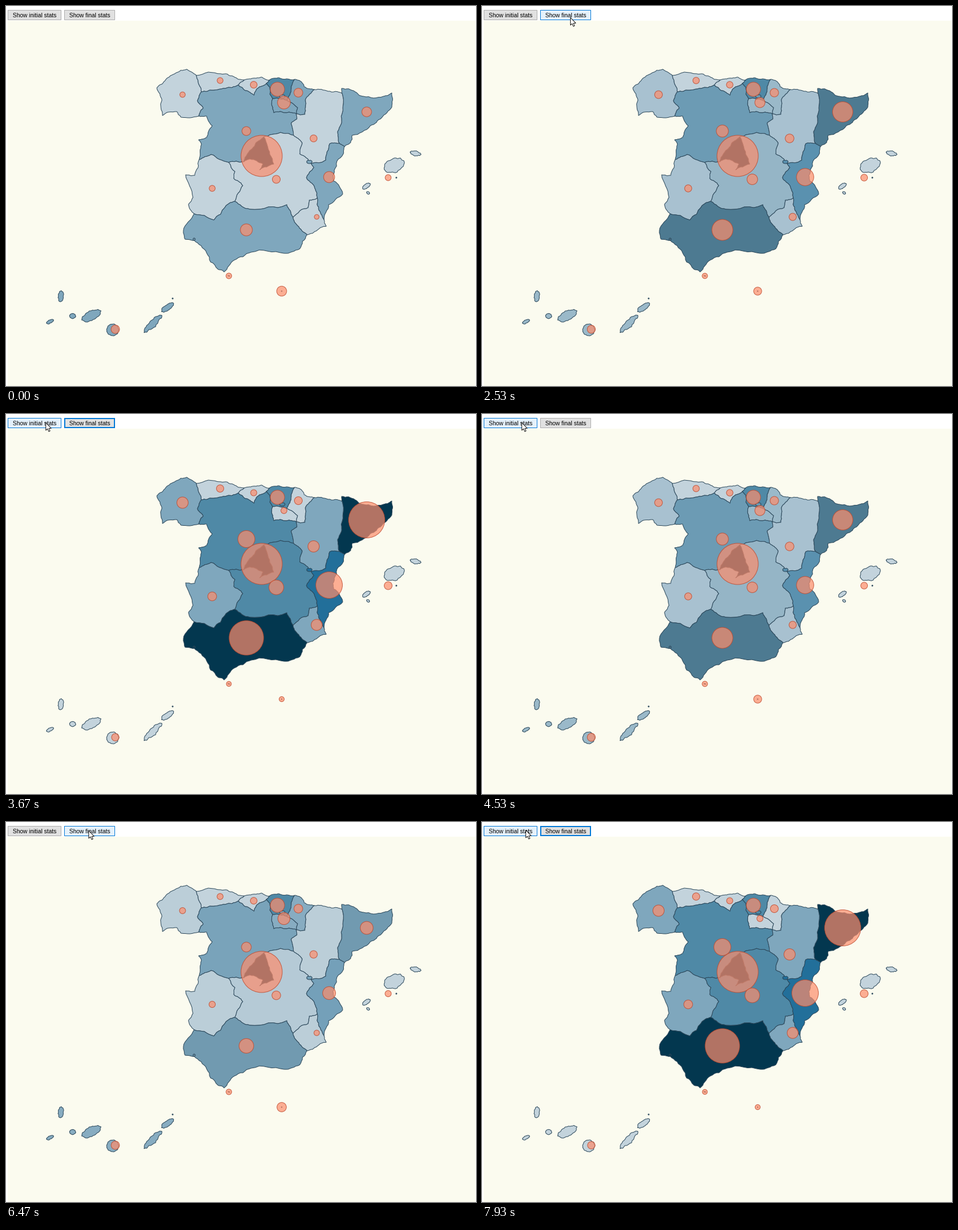
Write a matplotlib script that moves like this. It is 832 px wide and 673 px high and loops after 8 s.

```python
import matplotlib.pyplot as plt
import numpy as np
from matplotlib.animation import FuncAnimation
from matplotlib.patches import Circle, Polygon, Rectangle

W, H, DPI = 832, 673, 64
STEP, FRAMES = 40, 200
PX = 72 / DPI  # one pixel in points

PALETTE = np.array([(195, 211, 220), (127, 167, 189), (79, 137, 166), (34, 111, 154),
                    (3, 55, 79)]) / 255
CLASS_LIMITS = [7.3, 12, 20, 28]  # bubble radii where the fill colour changes
BORDER = "#2b475a"
BLUE = "#0078d7"

# Corners where borders meet.
NODES = dict(
    a=(337, 123), b=(341, 195), c=(346, 152), d=(422, 131), e=(411, 140), f=(461, 137),
    g=(467, 131), h=(511, 130), i=(497, 167), j=(472, 164), k=(514, 191), l=(546, 148),
    m=(595, 155), n=(590, 243), o=(540, 279), p=(509, 229), q=(599, 249), r=(394, 277),
    s=(342, 272), t=(551, 340), u=(508, 374), v=(405, 346), w=(333, 368), x=(563, 379),
    y=(533, 405), A=(456, 232), B=(421, 276), C=(449, 290),
)
# Key points between two corners; borders not listed run straight.
BENDS = dict(
    ab=[(320, 112), (300, 119), (283, 130), (267, 145), (276, 167), (277, 194), (302, 187),
        (310, 197)],
    bc=[(349, 181), (339, 168)],
    ca=[(341, 138)],
    ad=[(380, 120), (403, 125)],
    ce=[(361, 149), (388, 146)],
    dg=[(437, 128), (453, 126)],
    ef=[(424, 150), (439, 158), (445, 146)],
    fj=[(467, 144), (467, 156)],
    gh=[(483, 127)],
    hi=[(505, 146)],
    hl=[(521, 133), (528, 143)],
    ik=[(516, 180)],
    jk=[(471, 177), (474, 189), (497, 189)],
    kl=[(529, 192), (530, 166)],
    kp=[(515, 200), (505, 207)],
    lm=[(570, 151)],
    mn=[(597, 173), (594, 203), (587, 222)],
    mq=[(594, 146), (618, 152), (633, 160), (668, 160), (683, 154), (683, 179), (665, 198),
        (645, 212), (613, 229), (610, 242)],
    no=[(573, 244), (566, 273)],
    po=[(524, 242), (520, 262)],
    pA=[(486, 224)],
    AB=[(442, 243), (428, 261)],
    BC=[(432, 271), (455, 280)],
    CA=[(474, 280), (462, 245)],
    bs=[(355, 195), (365, 212), (355, 233), (341, 237), (346, 245)],
    sr=[(363, 263)],
    rv=[(405, 293), (403, 305), (419, 318)],
    sw=[(334, 300), (318, 299), (331, 339), (323, 352)],
    wv=[(368, 379), (388, 356)],
    vu=[(432, 360), (497, 352)],
    uy=[(516, 389)],
    wy=[(314, 398), (317, 413), (333, 415), (355, 437), (375, 466), (386, 471), (404, 450),
        (434, 436), (492, 438), (520, 430)],
    yx=[(551, 397), (567, 390)],
    xt=[(554, 362)],
    tu=[(537, 344), (535, 357)],
    qx=[(597, 262), (581, 291), (580, 310), (596, 333), (571, 352)],
    ot=[(545, 286), (532, 304), (546, 320)],
)

# Walk around the corners, bubble (x, y, radius before, radius after),
# islands and exclaves (x, y, half length, half width, tilt in degrees).
REGIONS = [
    ("abc", (312.5, 157, 4.8, 10), []),
    ("adec", (379, 132, 5.2, 6.5), []),
    ("dgfe", (438.5, 139.5, 6, 5.5), []),
    ("ghijf", (480.5, 147.5, 12.6, 12.6), []),
    ("hlki", (517.5, 153.5, 7.8, 7), []),
    ("jik", (492, 171, 11.4, 5.4), []),
    ("mqn", (638.5, 187.5, 8.6, 32), []),
    ("bcefjkpABrs", (425.5, 221.5, 7.8, 15), [(489, 160, 5, 3, 0)]),
    ("lmnopk", (544.5, 234.5, 6.2, 10), []),
    ("ABC", (452.5, 265.5, 36.5, 36.5), []),
    ("potuvrBCA", (478.5, 307, 7, 13), []),
    ("srvw", (365, 323, 5.3, 7.8), []),
    ("nqxto", (572, 303, 9.8, 23.5), [(537, 276, 5, 3, 0)]),
    ("txyu", (550, 373.5, 4.2, 9.8), []),
    ("wvuy", (425.5, 396.5, 10.6, 30.5), [(333, 413, 2, 2, 0)]),
    ("", (676.5, 304, 5.3, 7), [
        (687, 282, 19, 12, -25), (725, 261, 10, 4, 12), (638, 319, 8, 4, -35),
        (641, 331, 3, 2, 30), (691, 304, 1, 1, 0)]),
    ("", (394.5, 478, 5, 4.4), [(394.5, 478, 2, 0.6, 10)]),
    ("", (488, 505, 8.8, 4.5), [(488, 505, 0.8, 0.8, 0)]),
    ("", (193.5, 572.5, 7.5, 6.6), [
        (97, 514, 10, 5, 95), (78, 559, 7, 3, -25), (118, 549, 5.5, 4.5, 0),
        (151, 548, 19, 8, -25), (189, 573.5, 11, 10.5, 0), (260, 563, 22, 5.5, -44),
        (286, 534, 13, 5, -35), (295, 518, 1, 1, 0)]),
]

CLICKS = [2066, 3994, 6142]  # alternately "final" and "initial"
DURATION = 1000
ENTRY = (730, 441)
# start, end, x, y reached by the pointer
MOVES = [(400, 1200, 166, 30), (1200, 1520, 156, 20), (3180, 3640, 70, 15),
         (5280, 5860, 146, 15), (7620, 7920, 77, 14)]

rng = np.random.default_rng(7)
arcs = {}


def roughen(points, amount=0.11, levels=3):
    """Fractal midpoint displacement that keeps the given points."""
    for _ in range(levels):
        out = [points[0]]
        for (x0, y0), (x1, y1) in zip(points, points[1:]):
            k = rng.uniform(-amount, amount)
            out += [((x0 + x1) / 2 - k * (y1 - y0), (y0 + y1) / 2 + k * (x1 - x0)),
                    (x1, y1)]
        points = out
    return points


def arc(start, end):
    """Border between two corners, the same line in either direction."""
    if end + start in arcs:
        return arcs[end + start][::-1]
    if start + end not in arcs:
        bends = BENDS.get(start + end) or BENDS.get(end + start, [])[::-1]
        arcs[start + end] = roughen([NODES[start], *bends, NODES[end]])
    return arcs[start + end]


def outline(walk):
    return [point for start, end in zip(walk, walk[1:] + walk[0])
            for point in arc(start, end)[:-1]]


def island(x, y, length, width, tilt):
    angle, turn = np.linspace(0, 2 * np.pi, 11), np.radians(tilt)
    u, v = length * np.cos(angle), width * np.sin(angle)
    return roughen(list(zip(x + u * np.cos(turn) - v * np.sin(turn),
                            y + u * np.sin(turn) + v * np.cos(turn))), 0.18, 2)


def class_colour(radius):
    return PALETTE[np.searchsorted(CLASS_LIMITS, radius)]


def ease(u):
    u = min(max(u, 0), 1)
    return 4 * u ** 3 if u < 0.5 else 1 - 4 * (1 - u) ** 3


def pointer_at(t):
    x, y = ENTRY
    for start, end, to_x, to_y in MOVES:
        u = min(max((t - start) / (end - start), 0), 1)
        x, y = x + (to_x - x) * u, y + (to_y - y) * u
    return x, y


class Region:
    def __init__(self, walk, bubble, islands):
        x, y, self.before, self.after = bubble
        rings = [outline(walk)] if walk else []
        rings += [island(*spec) for spec in islands]
        self.shapes = [
            ax.add_patch(Polygon(ring, ec=BORDER, lw=PX, joinstyle="round", zorder=z))
            for z, ring in enumerate(rings, 1)
        ]
        self.bubble = ax.add_patch(Circle((x, y), self.before, zorder=20, lw=PX,
                                          fc=(0.992, 0.557, 0.427, 0.7),
                                          ec=(0.75, 0.29, 0.18, 0.85)))

    def show(self, p):
        first, last = class_colour(self.before), class_colour(self.after)
        for shape in self.shapes:
            shape.set_facecolor(first + (last - first) * p)
        self.bubble.set_radius(self.before + (self.after - self.before) * p)


class Button:
    def __init__(self, label, x, width):
        self.x, self.width = x, width
        self.box = ax.add_patch(Rectangle((x, 7), width, 18, snap=False))
        ax.text(x + width / 2, 20, label, ha="center", va="baseline",
                family="Liberation Sans", size=10.4 * PX, color="black")

    def contains(self, x, y):
        return self.x < x < self.x + self.width and 7 <= y < 25

    def show(self, hover, focus):
        line = 2 if focus and not hover else 1
        self.box.set(facecolor="#e5f1fb" if hover else "#e1e1e1",
                     edgecolor=BLUE if hover or focus else "#adadad", linewidth=line * PX)
        self.box.set_bounds(self.x + line / 2, 7 + line / 2, self.width - line, 18 - line)


fig = plt.figure(figsize=(W / DPI, H / DPI), dpi=DPI, facecolor="white")
ax = fig.add_axes([0, 0, 1, 1])
ax.set(xlim=(0, W), ylim=(H, 0))
ax.axis("off")
ax.add_patch(Rectangle((3, 26), 828, 647, fc="#fbfbef", ec="none", zorder=0))

regions = [Region(*spec) for spec in REGIONS]
buttons = [Button("Show initial stats", 3, 95), Button("Show final stats", 103, 90)]

ARROW = np.array([(0, 0), (0, 13.5), (3, 10.7), (5.2, 15.6), (7.4, 14.6), (5.3, 9.9),
                  (9.6, 9.9)])
arrow = ax.add_patch(Polygon(ARROW, fc="white", ec="black", lw=0.9 * PX, zorder=30))
BEAM = np.array([(-2.5, -6), (0, -5.5), (2.5, -6), (0, -5.5), (0, 5.5), (-2.5, 6),
                 (0, 5.5), (2.5, 6)])
beam, = ax.plot([], [], color="black", lw=1.1 * PX, zorder=30)


def draw(i):
    t = i * STEP + 10
    p = sum((-1) ** n * ease((t - click) / DURATION) for n, click in enumerate(CLICKS))
    for region in regions:
        region.show(p)

    x, y = pointer_at(t)
    visible = t >= MOVES[0][0]
    in_gap = 98 <= x <= 103 and 7 <= y < 25
    arrow.set_visible(visible and not in_gap)
    arrow.set_xy(ARROW + (x + 0.5, y + 0.5))
    beam.set_visible(visible and in_gap)
    beam.set_data(*(BEAM + (x + 0.5, y + 0.5)).T)

    clicks_done = sum(t >= click for click in CLICKS)
    for n, button in enumerate(buttons):
        button.show(visible and button.contains(x, y),
                    clicks_done > 0 and n == clicks_done % 2)
    return []


anim = FuncAnimation(fig, draw, frames=FRAMES, interval=STEP, repeat=True,
                     repeat_delay=0, blit=False)
plt.show()
```
